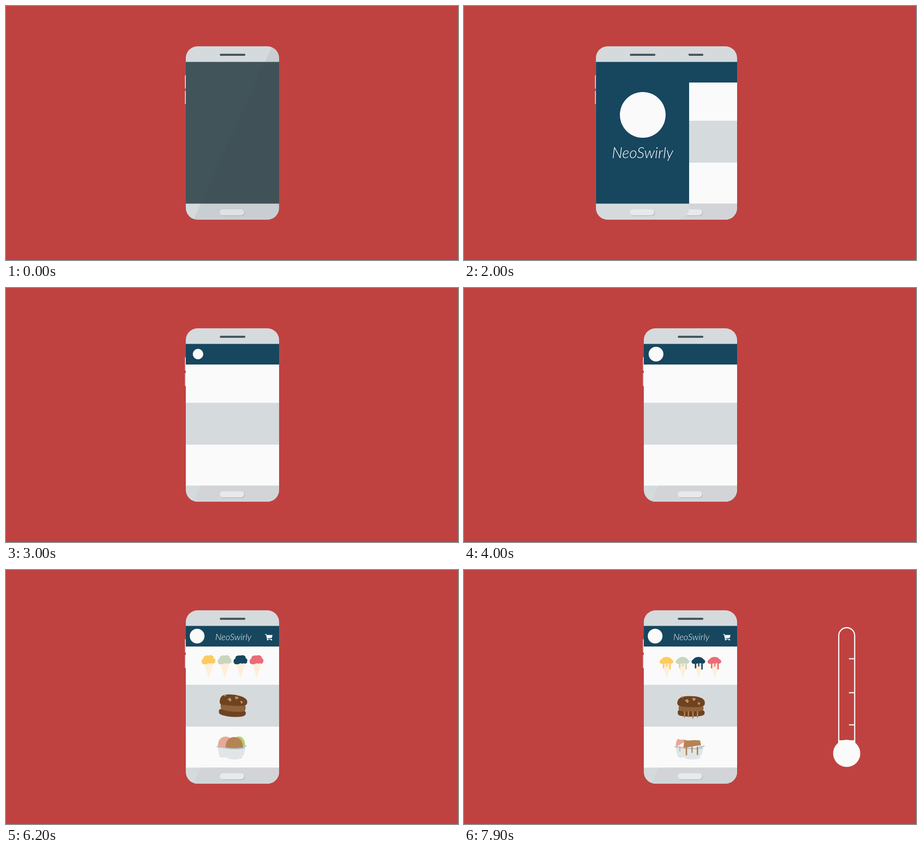
Animation, 998 px wide and 561 px high, one loop 8000 ms. Source, as an HTML page:

```html
<!DOCTYPE html>
<html lang="en">
<head>
<meta charset="utf-8">
<title>Ice cream app</title>
<style>
  html, body { margin: 0; width: 100%; height: 100%; overflow: hidden; background: #bf4240; }
  svg { display: block; width: 100vw; height: 100vh; }
  text { font-family: Lato, "Open Sans", sans-serif; font-weight: 300; font-style: italic; fill: #fff; text-anchor: middle; }
</style>
</head>
<body>
<svg id="stage" viewBox="0 0 998 561">
  <defs>
    <clipPath id="body"><rect x="397" y="89" width="206" height="383" rx="26"/></clipPath>
    <clipPath id="foot"><rect x="397" y="436.5" width="206" height="36"/></clipPath>
    <clipPath id="wipe"><path id="wipeEdge"/></clipPath>
  </defs>
  <rect width="998" height="561" fill="#bf4240"/>
  <g id="off"></g>
  <g id="list"></g>
  <g id="splash" clip-path="url(#wipe)"><g id="card"></g></g>
  <g id="thermo" fill="none" stroke="#fafafa" stroke-width="2.6">
    <path d="M827.4 384V145a17.6 17.6 0 0 1 35.2 0V384M850 196h13M850 271h13M850 342h13"/>
    <path d="M826.1 376h37.8v12h-37.8z" fill="#fafafa" stroke="none"/>
    <circle cx="845" cy="405" r="30" fill="#fafafa" stroke="none"/>
  </g>
</svg>
<script>
const LOOP = 8000, STEP = 100;
const NAVY = '#17465f', PALE = '#d5dadd', WHITE = '#fafafa';
const BRAND = 'NeoSwirly';
const $ = id => document.getElementById(id);

const clamp = u => Math.max(0, Math.min(1, u));
const span = (t, a, b) => clamp((t - a) / (b - a));
const smooth = u => u * u * (3 - 2 * u);
const cubic = u => u < .5 ? 4 * u ** 3 : 1 - 4 * (1 - u) ** 3;
const easeOut = u => 1 - (1 - u) ** 3;

// Blend two paths that share the same commands.
function blend(a, b, k) {
  const to = b.match(/-?[\d.]+/g);
  let i = 0;
  return a.replace(/-?[\d.]+/g, n => (+n + (to[i++] - n) * k).toFixed(2));
}

const rect = (y, h, fill) => `<rect x="397" y="${y}" width="206" height="${h}" fill="${fill}"/>`;
const glare = (fill, extra = '') => `<path d="M587.5 89H603V472H414Z" fill="${fill}" ${extra}/>`;

function phone(screen, shade, home = '#e8e9ec') {
  return `<path d="M397 152.5q-2 0-2 2v26.500q0 2 2 2zM397 187q-2 0-2 2v26q0 2 2 2z" fill="${PALE}"/>
    <g clip-path="url(#body)">${rect(89, 383, PALE)}${screen}${shade}</g>
    <rect x="472" y="105.5" width="56.500" height="4.500" rx="2.250" fill="#41545b"/>
    <rect x="473" y="450" width="54" height="13.500" rx="6.750" fill="#a6a9ae"/>
    <rect x="472" y="449" width="54" height="13.500" rx="6.750" fill="${home}"/>`;
}

const part = (id, x, y, inner) => `<g id="${id}" data-x="${x}" data-y="${y}">${inner}</g>`;
const shape = (id, fill) => `<path id="${id}" fill="${fill}"/>`;

const cones = [[447, '#fdcb5f'], [482.5, '#c9d6bd'], [517.5, NAVY], [553, '#ea6b77']];
const drips = [];

function drip(x, y0, y1, color, width = 3.2) {
  drips.push([y0, y1]);
  return `<line class="drip" x1="${x}" x2="${x}" y1="${y0}" y2="${y0}" stroke="${color}" stroke-width="${width}" stroke-linecap="round"/>`;
}

const coneArt = cones.map(([x, c], i) => part('cone' + i, x, 213, `
  <path d="M${x - 10} 205h21L${x + .5} 238.500Z" fill="#ffeed9"/>
  ${drip(x - 6.3, 205, 216, c)}${drip(x + .8, 204, 212, c, 2.6)}${drip(x + 8, 204, 218.5, c)}
  <g transform="translate(${x} 188)">${shape('scoop' + i, c)}</g>`)).join('');

const sandwichArt = part('sandwich', 501, 300, `
  ${shape('bunLow', '#6f4320')}
  ${[[487, 325], [495.5, 324], [505.5, 327], [515.5, 325]].map(([x, y]) => drip(x, 309, y, '#b5835a', 2.8)).join('')}
  ${shape('filling', '#8e623a')}${shape('bunTop', '#6f4320')}
  <path id="chips" d="M489 285l6-3 3 5-3 4zM506 279l8 2-4 5-4-2zM517 289l6 1-1 4-3 1zM481 276l6 0-3 4z" fill="#c2906a"/>`);

const cupArt = part('cups', 498, 393, `
  ${shape('green', '#b2d16a')}${shape('pink', '#e8a896')}
  <path d="M467 391H529L525 409q-18 4-36 4-17 4-18-3Z" fill="#e0e6e8"/>
  <path d="M466 390.500q16 2 22 2M520 390q8 0 10-1.500" fill="none" stroke="#b9bfc3" stroke-width="2.600" stroke-linecap="round"/>
  ${drip(476.5, 390, 400, '#e8a896', 2.6)}
  <path d="M483.500 393H525.500L521 416q-17 5-33 0Z" fill="#e0e6e8"/>
  ${shape('brown', '#b58455')}
  <path d="M483.500 393q20 3.500 42 0" fill="none" stroke="#b9bfc3" stroke-width="2.400" stroke-linecap="round"/>
  ${drip(491, 391, 408, '#b58455')}${drip(503.5, 391, 403, '#b58455', 2.6)}${drip(515.5, 391, 407.5, '#b58455')}`);

const cart = part('cart', 580, 148, `
  <path d="M572 141.500h3.200l.6 2H588.500l-1.500 6.500-9.500 1 .4 1.200h9.300v1.300h-10.700l-2.400-10.500H572z" fill="${WHITE}"/>
  <circle cx="577.800" cy="154" r="1.600" fill="${WHITE}"/><circle cx="585.800" cy="154" r="1.600" fill="${WHITE}"/>`);

$('off').innerHTML = phone(rect(123.5, 313, '#41545a'), glare('#3c3f43', 'opacity=".075"') + '', '#e0e1e4');
$('card').innerHTML = phone(rect(123.5, 313, NAVY), '') +
  `<circle cx="500.500" cy="240.500" r="50.500" fill="${WHITE}"/>
   <text x="500" y="335.500" font-size="33.500">${BRAND}</text>`;
$('list').innerHTML = phone(
  rect(123.5, 45.5, NAVY) + rect(169, 85, WHITE) + rect(253.5, 93, PALE) + rect(346, 90.5, WHITE),
  glare('#d3d4d7', 'clip-path="url(#foot)"')) +
  part('badge', 424, 146, `<circle cx="424" cy="146" r="16.300" fill="${WHITE}"/>`) +
  `<text id="title" x="502" y="154.500" font-size="19.800">${BRAND}</text>` +
  cart + coneArt + sandwichArt + cupArt;

// Each entry: fresh shape, melted shape.
const SCOOP = [
  'M-15 14C-15 10 -13 8 -11 8C-12 2 -6 0 0 1C7 -1 12 2 12 7C15 8 16 11 15 14C15 18 11 20 8 18C5 19 3 19 0 18C-3 19 -5 21 -8 20C-12 21 -15 18 -15 14Z',
  'M-15 15C-15 11 -12 10 -10 8C-7 5 -4 4 0 4C4 4 8 5 10 8C13 10 15 12 15 14C15 17 12 20 8 18C5 18 3 18 0 18C-3 19 -5 19 -8 19C-12 20 -15 18 -15 15Z'];
const MELT = {
  bunTop: [
    'M472 289C473 278 480 274 497 275C514 276 529 281 532 288C534 295 531 300 523 300C508 301 490 299 479 298C474 297 471 295 472 289Z',
    'M471 293C472 283 480 278 498 278.500C515 278 528 282 531 289C533 297 531 301 523 302C508 304 490 303 479 301C473 300 471 298 471 293Z'],
  filling: [
    'M474 298C473 293 478 294 484 295C498 298 512 299 524 298C530 298 530 304 528 310C526 314 515 313 502 313C490 312 480 310 476 307C473 304 474 301 474 298Z',
    'M474 303C474 299 478 299 484 300C498 301 512 301 524 300C529 300 530 304 528 309C526 312 515 312 502 312C490 312 480 312 477 311C473 309 474 306 474 303Z'],
  bunLow: [
    'M470 313C470 307 474 306 480 308C495 312 512 313 524 311C530 311 530 316 529 319C526 324 516 325 502 324.500C488 324 478 321 474 319C471 318 470 316 470 313Z',
    'M472 315C472 309 475 309 480 309.500C495 311 512 311 524 309.500C531 309 532 314 531 318C529 323 518 323 502 324C488 324 478 322 475 321C472 319 472 317 472 315Z'],
  pink: [
    'M468 391C467 378 473 368 485 368C497 368 501 378 500 391Z',
    'M468 391C467 383 470 373 473 373C480 377 488 372 492 377L494 391Z'],
  green: [
    'M503 389C502 377 505 367.500 514 367.500C523 367.500 528 376 528 389Z',
    'M505 389C508 383 510 378 514 377C520 376 523 375 525 373C528 378 528 384 528 389Z'],
  brown: [
    'M484.500 393C485 378 491 369 504 369C517 369 523 378 523.500 393Q504 396 484.500 393Z',
    'M484.500 393C485 386 486 379 487 376C497 378 507 374 521 377C523 381 523 387 523.500 393Q504 396 484.500 393Z']
};

const dripLines = [...document.querySelectorAll('.drip')];
const show = (id, on) => $(id).setAttribute('visibility', on ? 'visible' : 'hidden');

function pop(id, u, dx = 0) {
  const el = $(id), { x, y } = el.dataset;
  const s = easeOut(u);
  el.setAttribute('opacity', u > 0 ? 1 : 0);
  el.setAttribute('transform', `translate(${+x + dx} ${y}) scale(${s}) translate(${-x} ${-y})`);
}

function melt(k) {
  cones.forEach((c, i) => $('scoop' + i).setAttribute('d', blend(...SCOOP, k)));
  for (const id in MELT) $(id).setAttribute('d', blend(...MELT[id], k));
  $('chips').setAttribute('transform', `translate(${-1.5 * k} ${3 * k})`);
  // Match drips to their lines by start height, since lines are in paint order.
  dripLines.forEach((line, i) => {
    const [y0, y1] = drips[i];
    line.setAttribute('y2', y0 + (y1 - y0) * k);
    line.setAttribute('opacity', k > 0 ? 1 : 0);
  });
}

function draw(t) {
  const edge = 514 - 589 * smooth(span(t, 600, 1065));
  const wiping = t < 1100;
  $('wipeEdge').setAttribute('d', wiping ? `M${edge} 0H1600V561H${edge + 561}Z` : 'M0 0H998V561H0Z');

  const slide = -217 * (cubic(span(t, 1700, 2305)) - cubic(span(t, 2402, 2681)));
  $('card').setAttribute('transform', `translate(${slide} 0)`);
  const [back, front] = t < 2350 ? ['list', 'splash'] : ['splash', 'list'];
  if ($(back).nextElementSibling !== $(front)) $('stage').insertBefore($(back), $(front));

  show('off', wiping);
  show('list', t >= 1700);
  show('splash', t > 600 && t < 2700);

  pop('badge', span(t, 2850, 3300), -2 * smooth(span(t, 4000, 4300)));
  $('title').setAttribute('opacity', smooth(span(t, 4000, 4400)));
  pop('cart', span(t, 4300, 4600));
  cones.forEach((c, i) => pop('cone' + i, span(t, 4600 + i * 100, 4900 + i * 100)));
  pop('sandwich', span(t, 5200, 5600));
  pop('cups', span(t, 5600, 6000));

  $('thermo').setAttribute('opacity', smooth(span(t, 6400, 6900)));
  melt(smooth(span(t, 7100, 7900)));
}

let start;
function tick(now) {
  start ??= now;
  draw(Math.floor((now - start) % LOOP / STEP) * STEP);
  requestAnimationFrame(tick);
}
draw(0);
requestAnimationFrame(tick);
</script>
</body>
</html>
```
